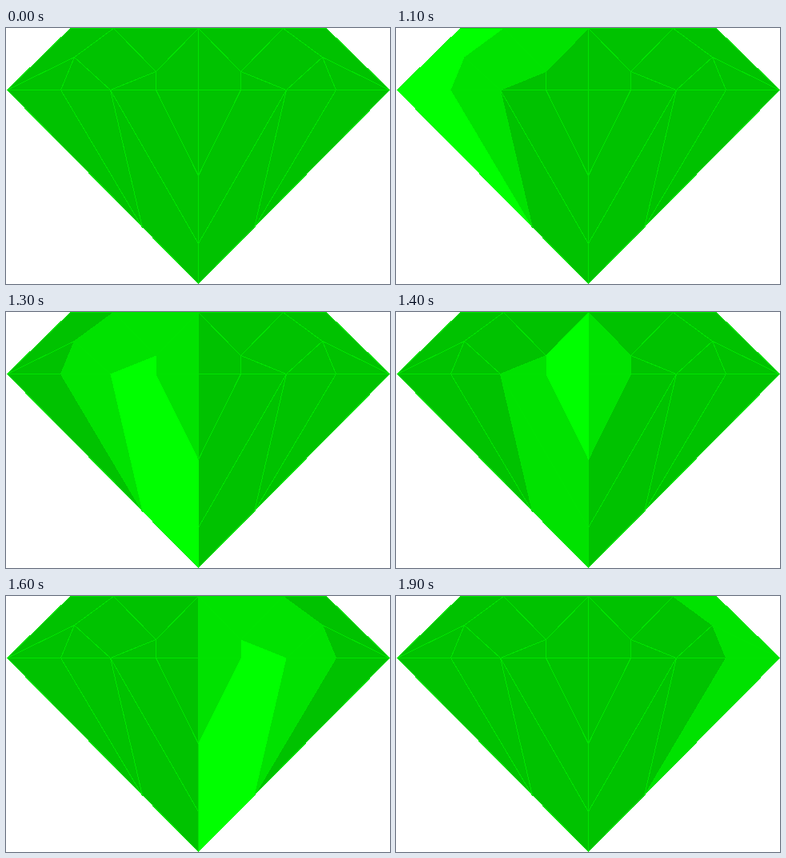
Animation, 480 px wide and 320 px high, one loop 2 s. Source, as an HTML page:

```html
<!DOCTYPE html>
<html>
<head>
<meta charset="utf-8">
<title>Gem</title>
<style>
html, body { margin: 0; height: 100%; overflow: hidden; background: #fff; }
svg { display: block; width: 480px; height: 320px; shape-rendering: crispEdges; }
</style>
</head>
<body>
<svg viewBox="0 0 480 320">
  <g transform="translate(.5 .5)">
    <path id="gem" d="M80 0H400L479 77L240 319L1 77Z" fill="#00c200"/>
    <g id="bands"></g>
    <g id="lines" fill="none" stroke="#00e400"></g>
    <path id="glow" fill="#0f0"/>
  </g>
</svg>
<script>
const DARK = '#00c200', MID = '#00e200';
const $ = id => document.getElementById(id);
const mirror = d => d.replace(/(\d+) (\d+)/g, (_, x, y) => `${480 - x} ${y}`);

// Facet bands from the left edge to the middle
const left = [
  'M80 0L134 0L85 36L68 77L170 249L1 77Z',
  'M134 0L240 0L187 54L130 77L170 249L68 77L85 36Z',
  'M130 77L187 54L187 77L240 184L240 319L170 249Z',
  'M240 0L187 54L187 77L240 184Z'
];
const shapes = [...left, ...left.map(mirror).reverse()];

const cuts = 'M1 77L85 36L134 0L187 54L240 0M85 36L68 77L170 249L130 77L85 36' +
  'M187 54L130 77L240 269M187 54L187 77L240 184';
const outline = $('gem').getAttribute('d');

function add(parent, d) {
  const p = document.createElementNS('http://www.w3.org/2000/svg', 'path');
  p.setAttribute('d', d);
  return parent.appendChild(p);
}

const bands = shapes.map(d => add($('bands'), d));
[cuts, mirror(cuts), 'M1 77H479M240 0V319', outline].forEach(d => add($('lines'), d));

const start = performance.now();
function draw(now) {
  const t = Math.max(0, now - start) % 2000;
  // The gleam rests for one second, then crosses one band every 100 ms
  const peak = t < 1000 ? -9 : Math.floor((t - 1000) / 100) - 1;
  bands.forEach((b, i) => b.setAttribute('fill', Math.abs(i - peak) < 2 ? MID : DARK));
  $('glow').setAttribute('d', shapes[peak] || '');
  requestAnimationFrame(draw);
}
draw(start);
</script>
</body>
</html>
```
